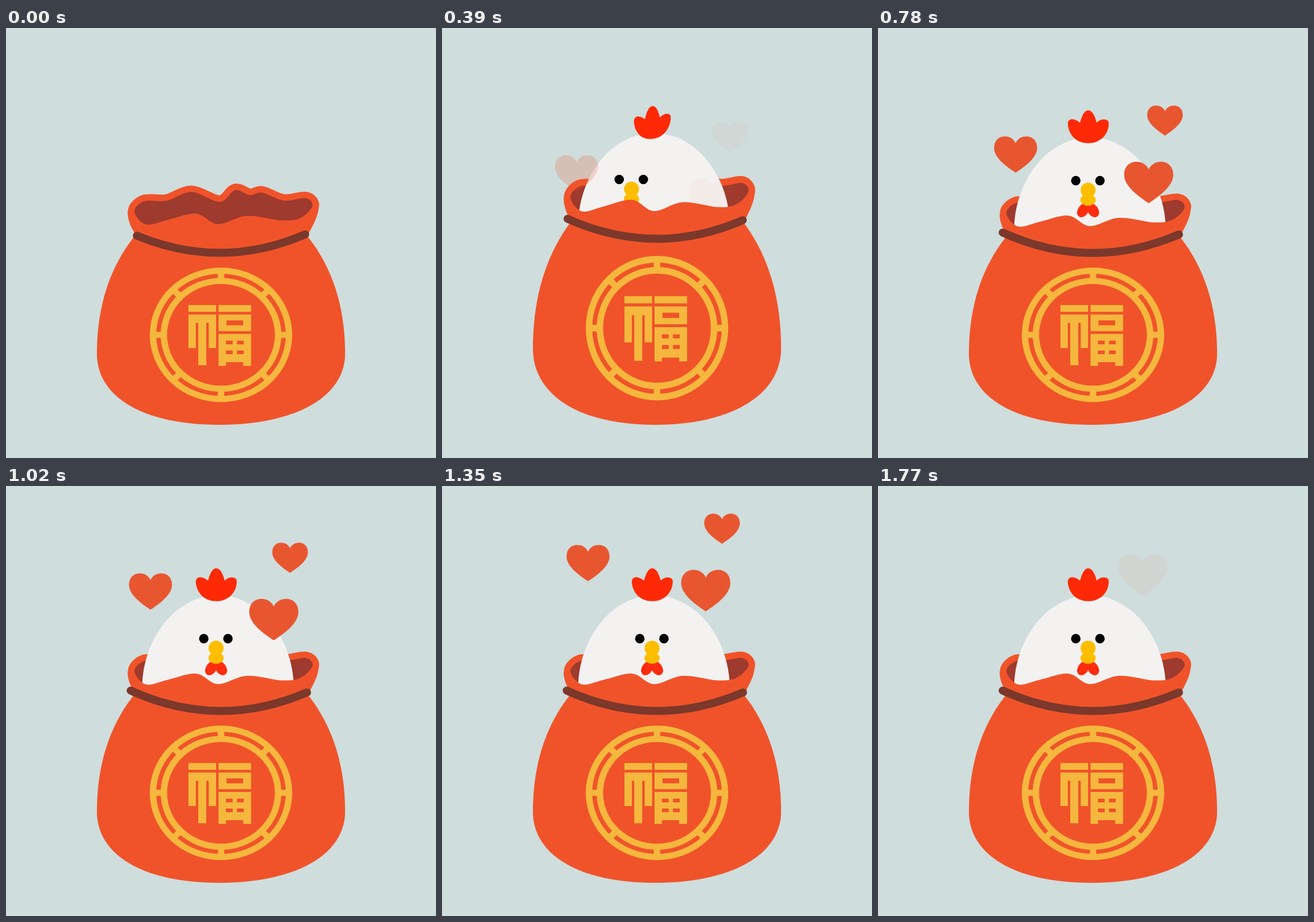
An HTML page for the animation above (1.98 s loop, 700 by 700 pixels).

```html
<!DOCTYPE html>
<html lang="en">
<head>
<meta charset="utf-8">
<title>Lucky bag</title>
<style>
  html, body { margin: 0; width: 100%; height: 100%; overflow: hidden; background: #cfdddc; }
  svg { display: block; width: 100vw; height: 100vh; }
</style>
</head>
<body>
<svg viewBox="0 0 700 700">
  <defs>
    <path id="heart" fill="#e85630" d="M0 0C-12 -8 -40 -26 -40 -46C-40 -60 -31 -67.5 -20 -67.5C-10 -67.5 -3 -62 0 -55C3 -62 10 -67.5 20 -67.5C31 -67.5 40 -60 40 -46C40 -26 12 -8 0 0Z"/>
  </defs>
  <rect width="700" height="700" fill="#cfdddc"/>

  <g class="bag"><g class="mouth">
    <path id="cavity" fill="#9e3a2e" stroke="#f0532a" stroke-width="21" stroke-linejoin="round" paint-order="stroke"/>
  </g></g>

  <g id="chick">
    <path fill="#f3f2f1" d="M221.5 330C221.5 250 275 178 345 178S468.5 250 468.5 330V400H221.5Z"/>
    <path id="comb" fill="#ff2a05" d="M342 134C350 134 354 146 356 154C362 148 371 147 375 152C378 162 370 187.5 342.5 187.5C318 187.5 309 168 309 155C310 147 318 146 329 154C331 146 335 134 342 134Z"/>
    <g id="face">
      <path fill="#ff2d0f" d="M342 284C330 284 324 294 324 301C325 311 337 310 342 300C347 310 359 311 360 301C360 294 354 284 342 284Z"/>
      <g fill="#fdbe00"><circle cx="342" cy="264" r="12.2"/><ellipse cx="342" cy="280" rx="12.5" ry="9.3"/></g>
      <circle cx="322" cy="248.5" r="7.7"/><circle cx="361.3" cy="248.5" r="7.7"/>
    </g>
  </g>

  <g class="bag">
    <g class="mouth"><path id="collar" fill="#f0532a"/></g>
    <path fill="#f0532a" d="M210 338C168 390 148 455 148 530C148 600 222 646 347 646C472 646 552 600 552 530C552 455 532 390 490 338Z"/>
    <g id="ring" transform="translate(350 499.5) scale(1 .944)" fill="none" stroke="#f5b73d" stroke-width="10.5">
      <circle r="110.7"/><circle r="93"/>
    </g>
    <path fill="#f5b73d" fill-rule="evenodd" d="M297 451h45v11h-45zM346 451h53v11h-53z
      M297 466.500h45v54.500h-12v-41h-4v69h-13v-69h-4v41h-12z
      M346 466.500h53v27h-53zM359 476v8h27v-8z
      M346 498h53v52h-13v-6h-28v6h-12zM358 509v6h11v-6zM376 509v6h11v-6zM358 525v6h11v-6zM376 525v6h11v-6z"/>
  </g>
  <path id="rope" fill="none" stroke="#7b382b" stroke-width="13" stroke-linecap="round"/>
  <g id="hearts"></g>
</svg>
<script>
const LOOP = 1980, STEP = 30, POP = 210, FLOOR = 646;
const NS = 'http://www.w3.org/2000/svg';
const get = id => document.getElementById(id);
const move = (el, value) => el.setAttribute('transform', value);

function add(parent, tag, attrs) {
  const el = document.createElementNS(NS, tag);
  for (const k in attrs) el.setAttribute(k, attrs[k]);
  return parent.appendChild(el);
}

const ramp = (t, a, b) => Math.min(1, Math.max(0, (t - a) / (b - a)));
const ease = (t, a, b) => (1 - Math.cos(Math.PI * ramp(t, a, b))) / 2;
// Eases out past 1 and settles back
const overshoot = (t, a, b) => {
  const w = ramp(t, a, b) - 1;
  return 1 + 2.7 * w ** 3 + 1.7 * w ** 2;
};

// Opening of the bag: back rim left to right, then front lip right to left
const back = [[209, 299], [225, 282], [262, 281], [302, 267], [348, 283], [373, 264], [397, 272], [417, 268], [452, 281], [488, 277]];
const front = [[499, 290], [480, 309], [450, 313.5], [392, 306], [345, 319.5], [310, 302.5], [265, 312], [228, 320]];
const loop = [...back, ...front];

// Smooth closed curve as one cubic per point
const cubics = loop.map((p, i) => {
  const at = k => loop[(i + k + loop.length) % loop.length];
  const [o, q, r] = [at(-1), at(1), at(2)];
  const c1 = p.map((v, k) => v + (q[k] - o[k]) / 6);
  const c2 = q.map((v, k) => v - (r[k] - p[k]) / 6);
  return `C${[...c1, ...c2, ...q]}`;
});
get('cavity').setAttribute('d', `M${loop[0]}${cubics.join('')}Z`);
get('collar').setAttribute('d', `M${front[0]}${cubics.slice(back.length).join('')}
  H198C198 315 204 325 214 342H489C500 320 509 306 509 290Z`);

for (let i = 0; i < 8; i++) add(get('ring'), 'path', { d: 'M93 0H110', transform: `rotate(${i * 45})` });

const hearts = [
  { x: 219, y: 267, size: 70, lift: 136, start: 330, fade: 275, end: 1750, sway: t => 20 * ease(t, 570, 1200) - 7 * ease(t, 1200, 1740) },
  { x: 468.5, y: 202, size: 58, lift: 133, start: 375, fade: 315, end: 1750 },
  { x: 442, y: 312, size: 80, lift: 133, start: 375, fade: 315, end: 1788 }
];
const swayRight = t => 2.5 * ease(t, 1500, 1770) - 13.5 * ease(t, 600, 1500);
for (const h of hearts) h.el = add(get('hearts'), 'use', { href: '#heart' });

const bags = document.querySelectorAll('.bag');
const mouths = document.querySelectorAll('.mouth');

function draw(t) {
  const stretch = 1 + .075 * Math.sin(Math.PI * ramp(t, POP, 540));
  const open = ease(t, POP, 450);
  bags.forEach(el => move(el, `translate(0 ${FLOOR * (1 - stretch)}) scale(1 ${stretch})`));
  mouths.forEach(el => move(el, `translate(0 ${3 * open})`));
  get('rope').setAttribute('d',
    `M${213 - 10 * open} ${338 - 5 * open}Q${350 - 4 * open} ${395 + 3 * open} ${487 + 3 * open} 336`);
  move(get('rope'), `translate(0 ${311 * (1 - stretch)})`);

  get('chick').setAttribute('visibility', t < POP ? 'hidden' : 'visible');
  move(get('chick'), `translate(0 ${200 * (1 - overshoot(t, POP, 426))})`);

  // Glance left, then right, then ahead
  const look = 50 * ease(t, 390, 510) - 33.5 * ease(t, 240, 375) - 16.5 * ease(t, 600, 720);
  move(get('face'), `translate(${look} ${look * look * .0045})`);
  const pinch = 1 - ease(t, 390, 500);
  move(get('comb'), `translate(343 187) skewY(${-6 * pinch}) scale(${1 - .1 * pinch} 1) translate(-343 -187)`);

  for (const h of hearts) {
    const x = h.x + (h.sway || swayRight)(t);
    const y = h.y - h.lift * ease(t, h.start, 1740);
    h.el.setAttribute('opacity', ramp(t, h.start, h.start + h.fade) * (1 - ramp(t, h.end - 310, h.end)));
    move(h.el, `translate(${x} ${y}) scale(${h.size / 80})`);
  }
}

const start = performance.now();
function tick() {
  const t = (performance.now() - start) % LOOP;
  draw(Math.floor(t / STEP) * STEP);
  requestAnimationFrame(tick);
}
tick();
</script>
</body>
</html>
```
